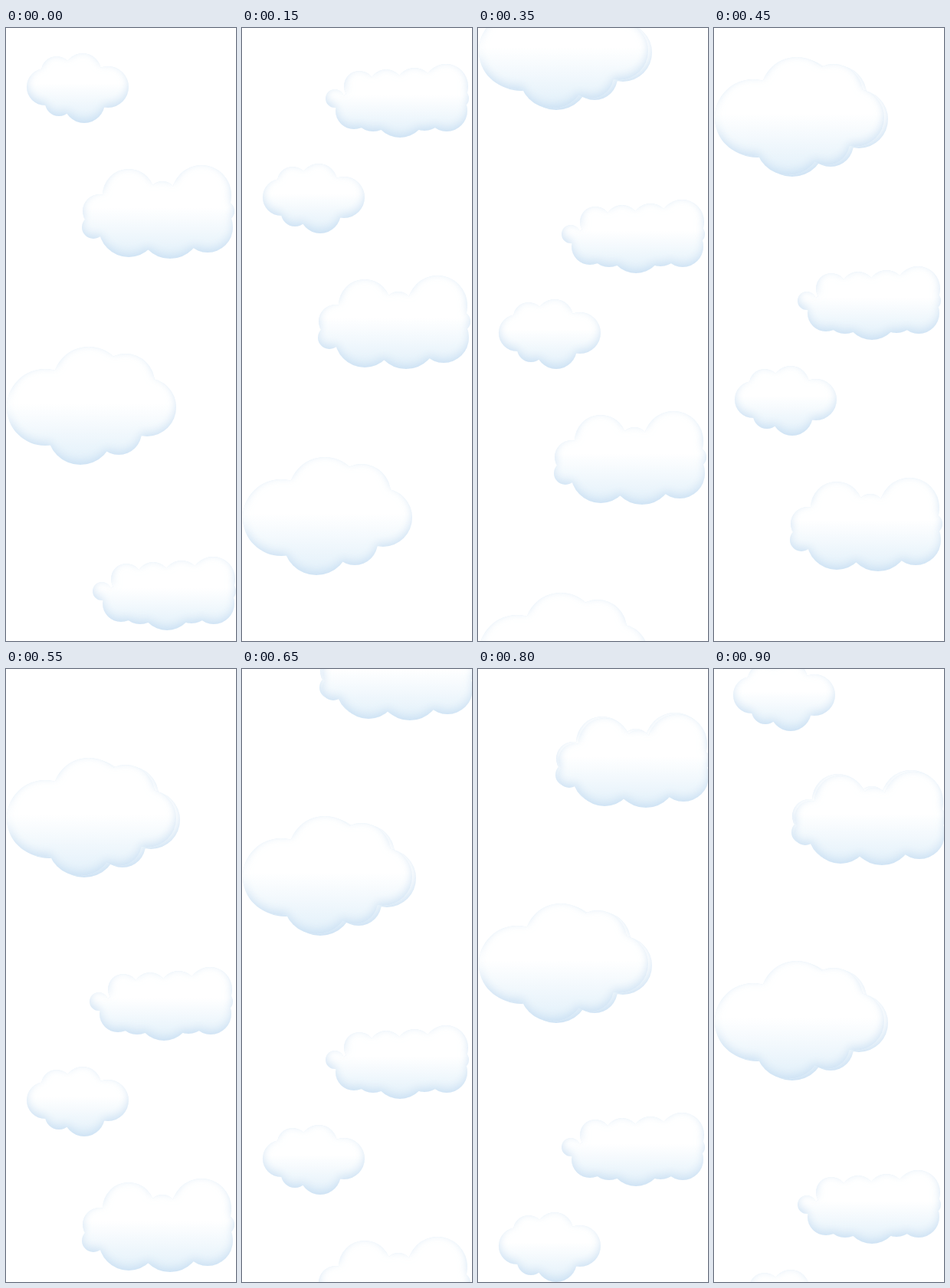
Recreate the animation shown at these times as an HTML page with a canvas. Size 300 px wide and 800 px high, loop 950 ms.

```html
<!DOCTYPE html>
<html lang="en">
<head>
<meta charset="utf-8">
<title>Drifting clouds</title>
<style>
  html, body { margin: 0; width: 100%; height: 100%; overflow: hidden; background: #fff; }
  canvas { display: block; width: 300px; height: 800px; }
</style>
</head>
<body>
<canvas id="sky" width="300" height="800"></canvas>
<script>
const ctx = document.getElementById('sky').getContext('2d');
const STEP = 50, STEPS = 19, W = 320, H = 200, MID = H / 2;

// A cloud is three rows of round puffs [x, radius], `gap` pixels apart.
const small = paint(20, [[66, 20], [100, 24]], [[51, 24], [133, 27]], [[69, 18], [102, 27]]);
const tall = paint(21, [[160, 34], [204, 18], [255, 39]], [[122, 22], [285, 13]],
  [[114, 15], [160, 39], [214, 41], [263, 33]]);
const wide = paint(32, [[108, 47], [156, 38]], [[51, 50], [184, 38]], [[97, 43], [147, 30]]);
const long = paint(16, [[153, 20], [188, 22], [225, 24], [266, 29]], [[121, 12], [284, 12]],
  [[146, 24], [171, 27], [206, 35], [238, 26], [267, 27]]);

function layer() {
  const canvas = document.createElement('canvas');
  canvas.width = W;
  canvas.height = H;
  return canvas.getContext('2d');
}

function outline(gap, rows) {
  const path = new Path2D(), low = rows[2];
  const left = low[0][0], right = low[low.length - 1][0];
  path.rect(left, MID - gap, right - left, 2 * gap);
  rows.forEach((row, i) => row.forEach(([x, r]) => {
    const y = MID + (i - 1) * gap;
    path.moveTo(x + r, y);
    path.arc(x, y, r, 0, 2 * Math.PI);
  }));
  return path;
}

function paint(gap, ...rows) {
  const path = outline(gap, rows);
  const bottom = MID + gap + Math.max(...rows[2].map(puff => puff[1]));

  const around = layer();
  around.fillStyle = '#dcebf7';
  around.fillRect(0, 0, W, H);
  around.globalCompositeOperation = 'destination-out';
  around.fill(path);

  const c = layer();
  const body = c.createLinearGradient(0, MID - 5, 0, bottom);
  body.addColorStop(0, '#fff');
  body.addColorStop(1, '#e2f0fa');
  c.fillStyle = body;
  c.fill(path);

  // The surroundings cast a soft blue shade inward, heavier below
  c.clip(path);
  c.shadowColor = 'rgba(186, 214, 238, .6)';
  c.shadowBlur = 12;
  c.shadowOffsetY = -4;
  c.drawImage(around.canvas, 0, 0);
  return c.canvas;
}

// The fall starts at 48 px a step and slows down twice.
function fallen(k) {
  return Math.round(48 * k - 4.8 * Math.max(0, k - 3.9) - 5.35 * Math.max(0, k - 9.6));
}

function put(cloud, x, y) {
  ctx.drawImage(cloud, x, y - MID);
}

function draw(k) {
  const y = fallen(k);
  ctx.fillStyle = '#fff';
  ctx.fillRect(0, 0, 300, 800);

  put(small, 0, y + 77);
  put(tall, 0, y + 239);
  put(wide, 0, y + 495);
  put(long, 4, y + 735);

  // Followers; two of them have a doubled rim
  put(long, 0, y - 52);
  put(wide, 5, y - 289);
  put(wide, 0, y - 291);
  put(tall, 2, y - 559);
  put(tall, 5, y - 557);
  put(small, -2, 77 - 43 * (STEPS - k));
}

const start = performance.now();

function tick() {
  draw(Math.floor((performance.now() - start) / STEP) % STEPS);
  requestAnimationFrame(tick);
}
tick();
</script>
</body>
</html>
```
